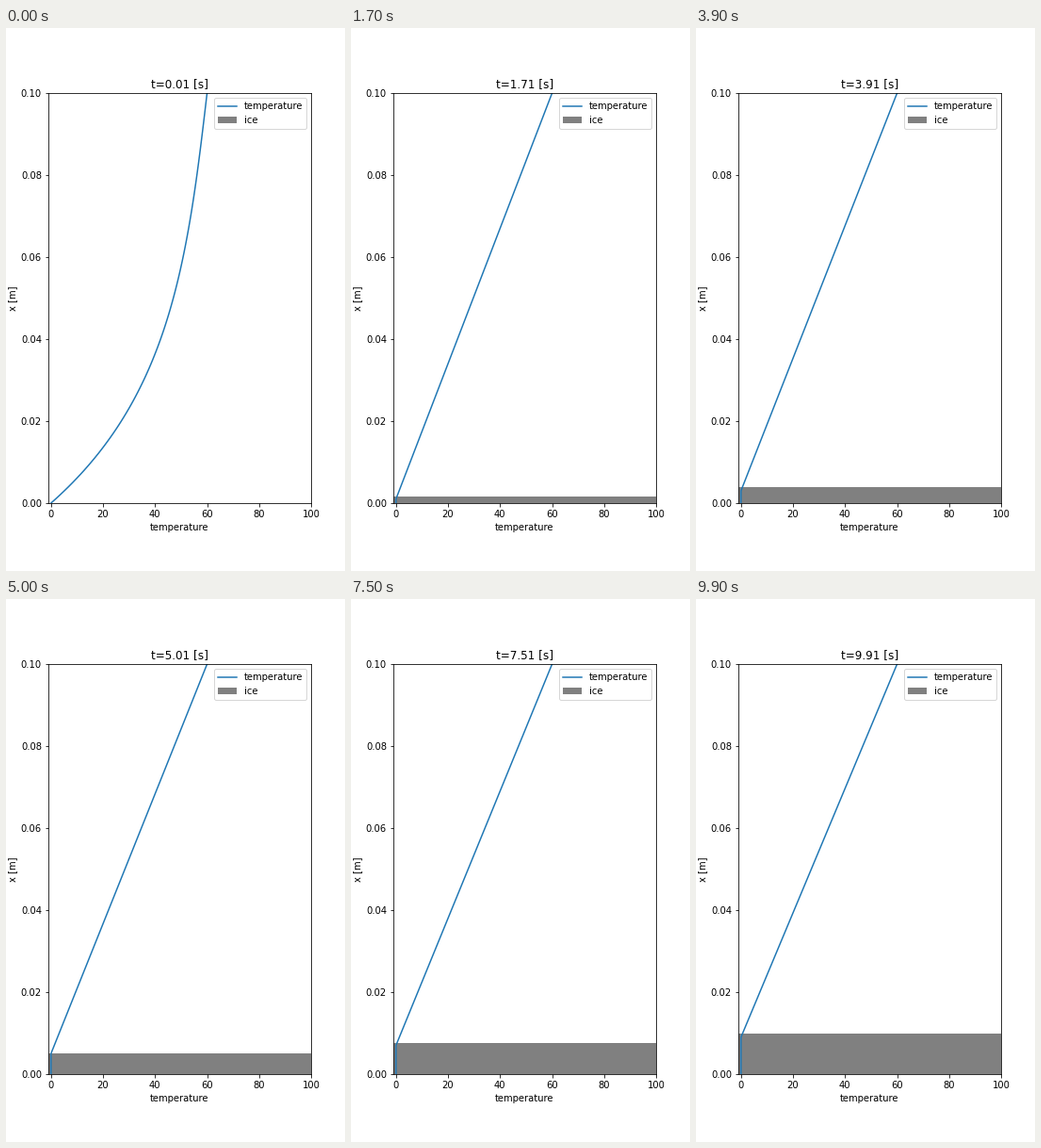
A matplotlib script that plays this animation: 360 by 576 pixels, repeating every 10 s.

```python
import numpy as np
import matplotlib.pyplot as plt
from matplotlib.animation import FuncAnimation

DEPTH = 0.1          # m
T_TOP = 60.0         # fixed temperature at the upper end
GROWTH = 0.001       # ice growth, m/s
DIFF_LEN = np.sqrt(0.00114 / 1.0)   # diffusion length of one time step
FRAMES, INTERVAL = 100, 100

x = np.linspace(0, DEPTH, 101)


def profile(i, t):
    if i == 0:
        # first implicit step of cooling from a uniform temperature
        return T_TOP * (1 - np.sinh((DEPTH - x) / DIFF_LEN) / np.sinh(DEPTH / DIFF_LEN))
    # quasi-steady: zero inside the ice, linear above the last frozen node
    front = x[int(t + 1e-6)]
    return T_TOP * np.clip((x - front) / (DEPTH - front), 0, 1)


fig, ax = plt.subplots(figsize=(5, 8), dpi=72)
fig.subplots_adjust(left=0.125, right=0.9, bottom=0.125, top=0.88)

line, = ax.plot([], [], color="C0", lw=1.5, label="temperature")
ice = plt.Rectangle((-1, 0), 101, 0, fc="gray", ec="none", lw=0, zorder=1, label="ice")
ax.add_patch(ice)
ax.set(xlim=(-1, 100), ylim=(0, DEPTH), xlabel="temperature", ylabel="x [m]")
ax.legend(handles=[line, ice], loc="upper right")
title = ax.set_title("")


def update(i):
    t = 0.01 + 0.1 * i
    line.set_data(profile(i, t), x)
    ice.set_height(GROWTH * t)
    title.set_text(f"t={t:.2f} [s]")
    return line, ice, title


anim = FuncAnimation(fig, update, frames=FRAMES, interval=INTERVAL,
                     repeat=True, repeat_delay=0, blit=False)
plt.show()
```
